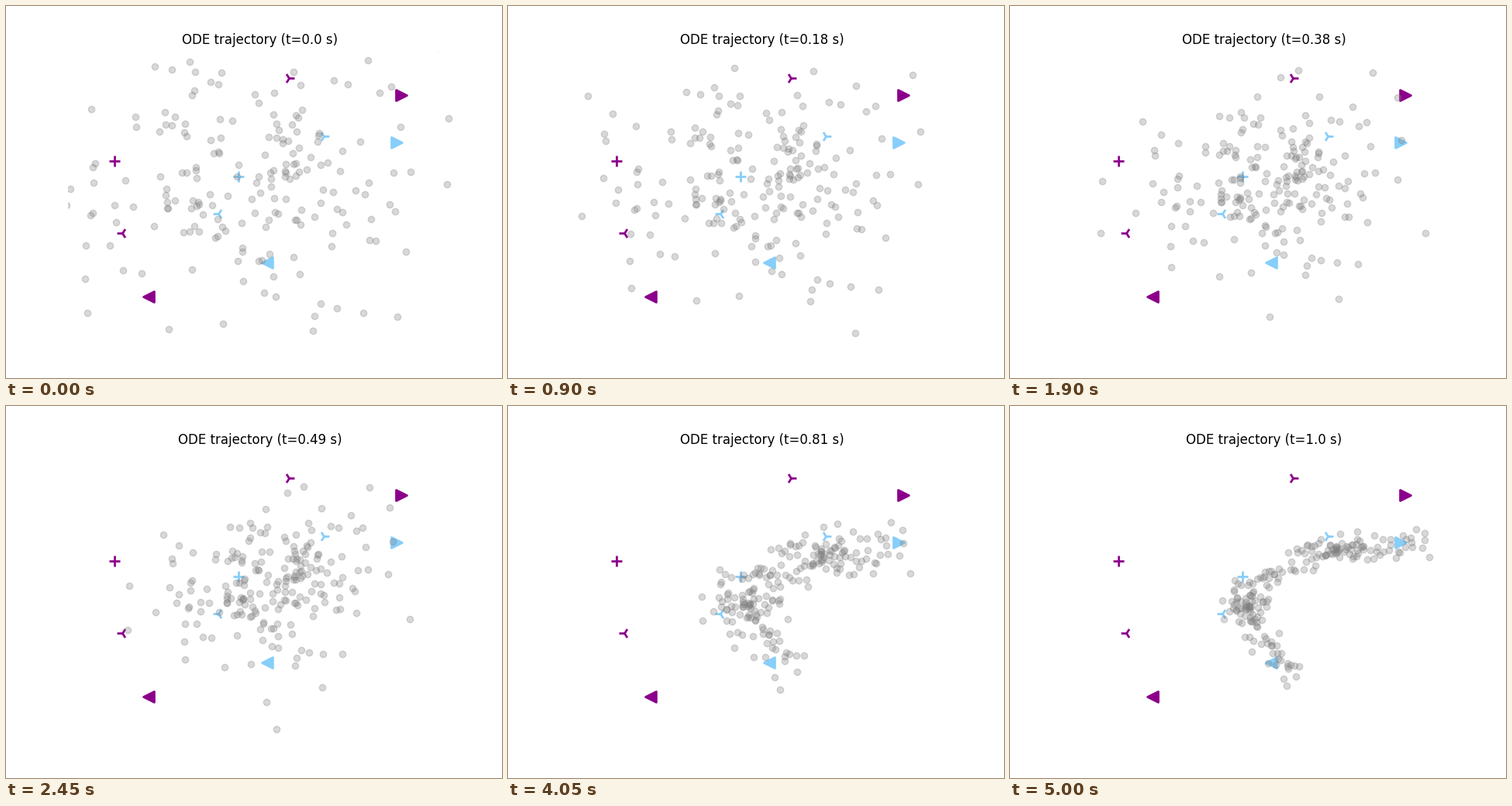
Animation of 640 by 480 pixels, one loop 5.55 s. Source, as a matplotlib script:

```python
import numpy as np
import matplotlib.pyplot as plt
from matplotlib.animation import FuncAnimation

STEPS, HOLD, DOTS = 100, 10, 204

# Starting cloud: a normal distribution, in pixels from the top left
CENTRE = np.array([309, 227])
SPREAD = np.array([121, 92])

# Arc on which the dots settle; equal shares of them lie between its knots
ARC_X = [358, 328, 306, 301, 318, 385, 420, 470, 535]
ARC_Y = [338, 304, 266, 249, 231, 188, 184, 182, 178]
WIDTH = 0.1  # thickness of the arc, relative to SPREAD

MARKS = {
    "darkmagenta": [(184.3, 375), (149.5, 293), (140, 200), (364.5, 93), (510, 115)],
    "lightskyblue": [(337.3, 331), (273.5, 268), (300, 220), (409.5, 168), (504, 176)],
}


def arc_points(count=64):
    """Evenly weighted points along the arc, in units of the cloud."""
    share = np.linspace(0, 1, count)
    knots = np.linspace(0, 1, len(ARC_X))
    px = np.column_stack([np.interp(share, knots, v) for v in (ARC_X, ARC_Y)])
    return (px - CENTRE) / SPREAD


def velocity(p, t, arc):
    """Flow that carries a standard normal cloud onto the blurred arc."""
    away = p[:, None] - t * arc
    var = (1 - t) ** 2 + (t * WIDTH) ** 2
    near = -(away ** 2).sum(-1) / (2 * var)
    weight = np.exp(near - near.max(1, keepdims=True))
    weight /= weight.sum(1, keepdims=True)
    shrink = (t * WIDTH ** 2 - (1 - t)) / var
    return (weight[..., None] * (arc + shrink * away)).sum(1)


def trajectory():
    """Dot places in pixels at every step."""
    p = np.random.default_rng(11).normal(size=(DOTS, 2))
    p = (p - p.mean(0)) / p.std(0)
    arc = arc_points()
    k = np.linspace(0, 1, STEPS + 1)
    times = k + 0.22 * k * (1 - k)  # slightly quicker at first
    path = [p]
    for t, dt in zip(times, np.diff(times)):
        p = p + dt * velocity(p, t, arc)
        path.append(p)
    return CENTRE + SPREAD * np.array(path)


path = trajectory()

fig, ax = plt.subplots(figsize=(6.4, 4.8), dpi=100)
ax.set(xlim=(80, 576), ylim=(427.2, 57.6))
ax.axis("off")

for color, places in MARKS.items():
    for marker, (x, y) in zip("<3+4>", places):
        ax.scatter(x, y, s=100, marker=marker, color=color, linewidth=2)

dots = ax.scatter(*path[0].T, color="gray", alpha=0.3)


def update(frame):
    step = min(frame, STEPS)
    dots.set_offsets(path[step])
    ax.set_title(f"ODE trajectory (t={step / STEPS} s)")
    return [dots]


anim = FuncAnimation(fig, update, frames=STEPS + 1 + HOLD, interval=50,
                     repeat=True, repeat_delay=0, blit=False)
plt.show()
```
